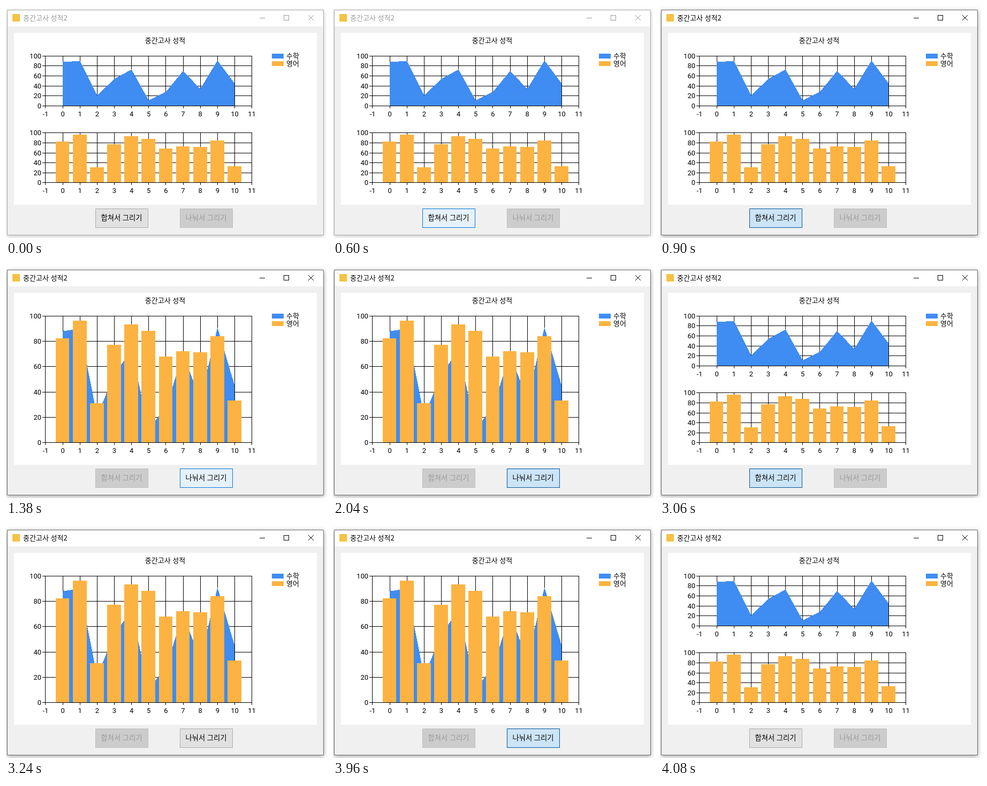
These frames come from a looping animation (600 px wide and 433 px high, 4.98 s). An HTML page:

```html
<!DOCTYPE html>
<html lang="ko">
<head>
<meta charset="utf-8">
<title>중간고사 성적2</title>
<style>
html, body { margin: 0; width: 100%; height: 100%; overflow: hidden; background: #fff; }
#win { position: absolute; left: 2px; top: 7px; width: 590px; height: 419px;
  border: 1px solid #aaa; background: #f0f0f0; box-shadow: 0 2px 7px rgba(0,0,0,.22); }
#win.active { border-color: #707070; box-shadow: 0 2px 8px rgba(0,0,0,.38); }
svg { position: absolute; left: 0; top: 0; display: block; }
text { font: 13px "Noto Sans CJK KR", "Noto Sans CJK", sans-serif; }
text.num { font: 13px Roboto, "Liberation Sans", sans-serif; }
text.cap { font-size: 13.3px; }
#bar { stroke: #999; fill: #999; }
#bar.active { stroke: #000; fill: #000; }
#bar text { stroke: none; }
#bar path { fill: none; }
</style>
</head>
<body>
<div id="win"></div>
<svg id="stage" width="600" height="433" viewBox="0 0 600 433"></svg>
<script>
const LOOP = 4980;
const BLUE = '#3f8cf2', ORANGE = '#fdb341';
const math = [88, 90, 21, 54, 73, 11, 28, 70, 34, 91, 45];
const english = [82, 96, 31, 77, 93, 88, 68, 72, 71, 84, 33];

// start, window active, charts merged, merge button, split button
const steps = [
  [0, 0, 0, 'normal', 'off'],
  [600, 0, 0, 'hover', 'off'],
  [900, 1, 0, 'down', 'off'],
  [960, 1, 1, 'off', 'normal'],
  [1380, 1, 1, 'off', 'hover'],
  [2040, 1, 1, 'off', 'down'],
  [2160, 1, 0, 'normal', 'off'],
  [2640, 1, 0, 'hover', 'off'],
  [3060, 1, 0, 'down', 'off'],
  [3240, 1, 1, 'off', 'normal'],
  [3480, 1, 1, 'off', 'hover'],
  [3960, 1, 1, 'off', 'down'],
  [4080, 1, 0, 'normal', 'off']
];

// fill, border, text
const looks = {
  normal: ['#e1e1e1', '#adadad', '#000'],
  hover: ['#e5f1fb', '#0078d7', '#000'],
  down: ['#cce4f7', '#005499', '#000'],
  off: ['#cccccc', '#bfbfbf', '#9a9a9a']
};

const stage = document.getElementById('stage');
const win = document.getElementById('win');

function el(parent, tag, attrs, content) {
  const node = document.createElementNS('http://www.w3.org/2000/svg', tag);
  for (const key in attrs) node.setAttribute(key, attrs[key]);
  if (content !== undefined) node.textContent = content;
  parent.appendChild(node);
  return node;
}

const rect = (parent, x, y, width, height, fill) =>
  el(parent, 'rect', { x, y, width, height, fill, 'shape-rendering': 'crispEdges' });

const label = (parent, x, y, content, anchor = 'start', cls = '') =>
  el(parent, 'text', { x, y, 'text-anchor': anchor, class: cls }, content);

const UNIT = 32.14;
const xAt = v => 73.4 + (v + 1) * UNIT;

function chart(parent, top, bottom, series) {
  const yAt = v => bottom - v * (bottom - top) / 100;
  const y0 = Math.round(bottom), y100 = Math.round(top);
  const line = (x, y, w, h) => rect(parent, Math.round(x), Math.round(y), w, h, '#000');

  for (let v = -1; v <= 11; v++) {
    line(xAt(v), y100, 1, y0 - y100 + 5);
    label(parent, xAt(v) + 0.5, y0 + 20, v, 'middle', 'num');
  }
  for (let v = 0; v <= 100; v += 20) {
    line(68, yAt(v), 392, 1);
    label(parent, 66, Math.round(yAt(v)) + 5, v, 'end', 'num');
  }
  if (series.includes('area')) {
    const points = math.map((v, i) => [xAt(i), yAt(v)]);
    points.push([xAt(10), bottom], [xAt(0), bottom]);
    el(parent, 'polygon', {
      points: points.join(' '), fill: BLUE,
      transform: 'translate(.5 .5)', 'shape-rendering': 'crispEdges'
    });
  }
  if (series.includes('bars')) {
    english.forEach((v, i) => {
      const left = Math.round(xAt(i) - UNIT * 0.4);
      const right = Math.round(xAt(i) + UNIT * 0.4);
      const y = Math.round(yAt(v));
      rect(parent, left, y, right - left, y0 - y, ORANGE);
    });
  }
  line(73, y0, 387, 1);
}

function button(x, caption) {
  const box = rect(stage, x + 0.5, 378.5, 98, 35, '#ccc');
  const text = label(stage, x + 49, 400, caption, 'middle', 'cap');
  return look => {
    const [fill, border, ink] = looks[look];
    box.setAttribute('fill', fill);
    box.setAttribute('stroke', border);
    text.setAttribute('fill', ink);
  };
}

// title bar
rect(stage, 3, 8, 590, 30, '#fff');
rect(stage, 12, 15, 14, 14, '#f5c242');
const bar = el(stage, 'g', { id: 'bar' });
label(bar, 32, 27, '중간고사 성적2');
el(bar, 'path', { d: 'M474 22.5h10M519.5 17.5h9v9h-9z', 'shape-rendering': 'crispEdges' });
el(bar, 'path', { d: 'M565 17l10 10M575 17l-10 10' });

// chart panel
rect(stage, 15, 50, 566, 321, '#fff');
label(stage, 297.5, 69, '중간고사 성적', 'middle');
[[BLUE, '수학'], [ORANGE, '영어']].forEach(([color, name], i) => {
  rect(stage, 497, 89 + i * 14, 22, 9, color);
  label(stage, 524, 97.5 + i * 14, name);
});

const split = el(stage, 'g', {});
chart(split, 92.8, 185.9, ['area']);
chart(split, 236.35, 329.4, ['bars']);
const merged = el(stage, 'g', {});
chart(merged, 92.8, 329.4, ['area', 'bars']);

const setMerge = button(167, '합쳐서 그리기');
const setSplit = button(325, '나눠서 그리기');

let shown;
function draw(time) {
  const t = time % LOOP;
  const step = steps.filter(s => s[0] <= t).pop();
  if (step === shown) return;
  shown = step;
  const [, active, joined, mergeLook, splitLook] = step;
  win.classList.toggle('active', !!active);
  bar.classList.toggle('active', !!active);
  split.style.display = joined ? 'none' : '';
  merged.style.display = joined ? '' : 'none';
  setMerge(mergeLook);
  setSplit(splitLook);
}

const start = performance.now();
function tick() {
  draw(performance.now() - start);
  requestAnimationFrame(tick);
}
tick();
</script>
</body>
</html>
```
